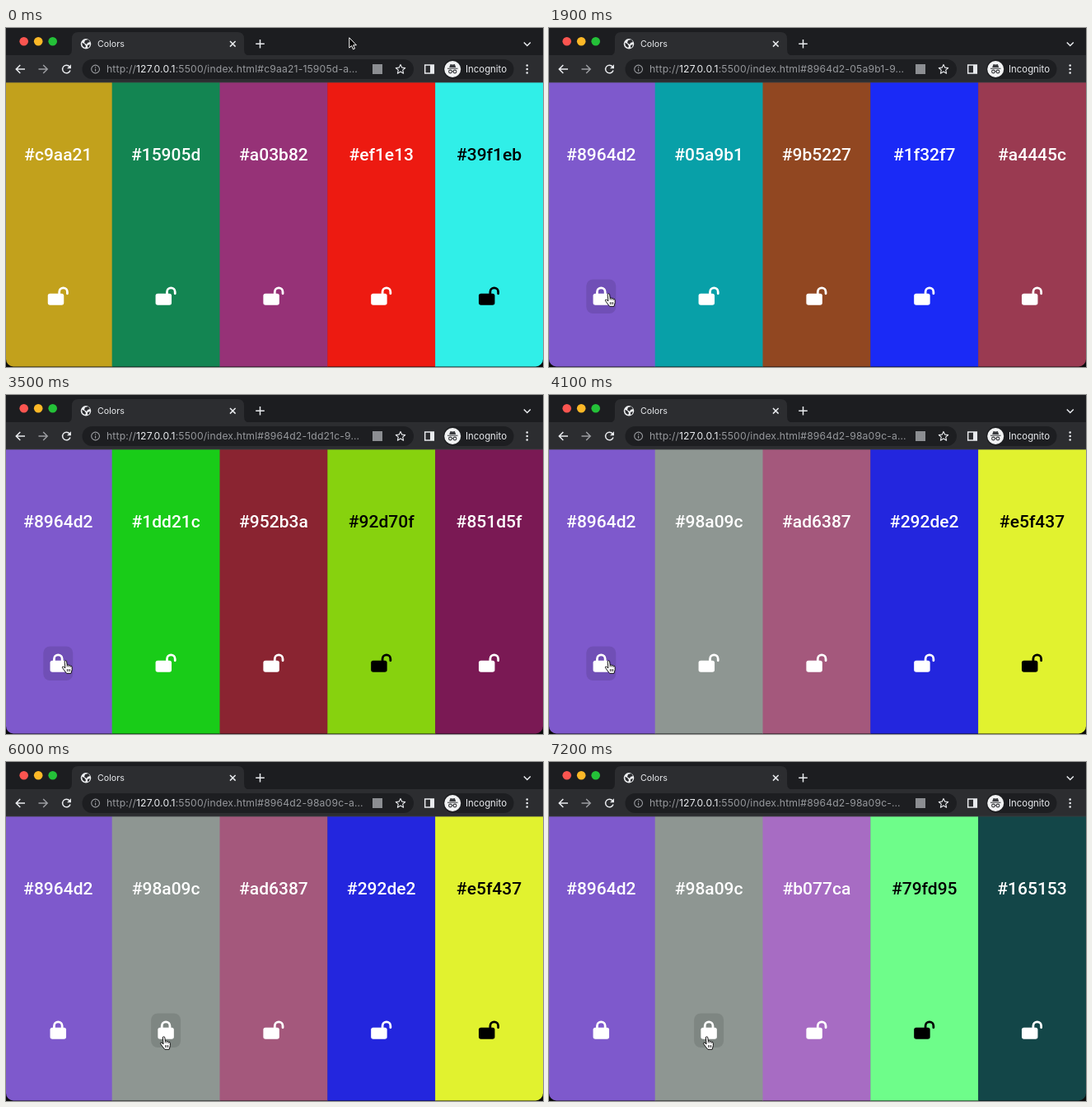
Recreate the animation shown at these times as an HTML page. Size 652 by 412 pixels, loop 8000 ms.

```html
<!DOCTYPE html>
<html lang="en">
<head>
<meta charset="utf-8">
<title>Colors</title>
<style>
  html, body { margin: 0; width: 100%; height: 100%; overflow: hidden; background: #0b0b0c; }
  svg { display: block; width: 652px; height: 412px; }
  text { white-space: pre; }
  .ui { font-family: Inter, "Liberation Sans", sans-serif; fill: #e8eaed; }
  .address { font-size: 12.2px; letter-spacing: .15px; }
  .grey { fill: #96989c; }
  .hex { font: 500 21px Roboto, "Liberation Sans", sans-serif; text-anchor: middle; stroke: none; }
  .line { fill: none; stroke: #e8eaed; stroke-width: 1.5; }
  .thin { stroke-width: 1.1; }
  .dim { stroke: #9a9ca0; }
</style>
</head>
<body>
<svg viewBox="0 0 652 412">
  <defs><clipPath id="window"><path d="M0 0H652V402.500a9 9 0 0 1-9 9H9a9 9 0 0 1-9-9z"/></clipPath></defs>
  <g clip-path="url(#window)">
    <rect width="652" height="34" fill="#1c1d20"/>
    <rect y="33" width="652" height="34" fill="#2c2d30"/>

    <!-- tab strip -->
    <circle cx="21.7" cy="16.3" r="5.3" fill="#fb5550"/>
    <circle cx="39.2" cy="16.3" r="5.3" fill="#fcb827"/>
    <circle cx="56.7" cy="16.3" r="5.3" fill="#24c138"/>
    <path fill="#2c2d30" d="M72 34q8 0 8-8V13q0-8 8-8H281q8 0 8 8v13q0 8 8 8z"/>
    <circle cx="97" cy="19.3" r="6.2" fill="#eceef0"/>
    <path fill="#2c2d30" d="M92 18l3 1 2 3-1 2-3-2zM96 15l4-1 2 3-3 1-1 2-3-2zM99 21l3-1-1 3-2 1z"/>
    <text class="ui" x="111" y="23" font-size="10.7">Colors</text>
    <path class="line" d="M272 16l6.600 6.600m0-6.600L272 22.600"/>
    <path class="line" d="M303.200 19.300h10.600M308.500 14v10.600"/>
    <path class="line" d="M628.800 17.500l4 4 4-4"/>

    <!-- toolbar -->
    <path class="line" d="M23 50H12.500M17.300 45l-5 5 5 5"/>
    <path class="line dim" d="M39.500 50H50M45.200 45l5 5-5 5"/>
    <path class="line" d="M77.200 47A4.800 4.800 0 1 0 78 51.500"/>
    <path fill="#e8eaed" d="M79 44.200v5h-5z"/>
    <rect x="92.500" y="38" width="402.500" height="24" rx="12" fill="#1d1e21"/>
    <circle class="line thin dim" cx="108.600" cy="50" r="4.900"/>
    <path class="line thin dim" d="M108.600 49.400v3.300M108.600 47v1.300"/>
    <text class="ui address" x="122" y="54.300"><tspan class="grey">http://</tspan>127.0.0.1<tspan id="path" class="grey"></tspan></text>
    <rect x="445" y="44" width="12" height="12" fill="#8c8e92"/>
    <path class="line thin" stroke-linejoin="round"
      d="M479 44.400l1.700 3.700 4 .4-3 2.700.9 4-3.600-2.100-3.600 2.100.9-4-3-2.700 4-.4z"/>
    <rect class="line" x="508.700" y="45" width="10.600" height="10"/>
    <path fill="#e8eaed" d="M515 45h4.500v10h-4.500z"/>
    <rect x="531" y="38" width="85.500" height="24" rx="12" fill="#1d1e21"/>
    <circle cx="542.200" cy="50" r="10" fill="#f1f2f3"/>
    <path fill="#393b3f" d="M536 48.700h12.500v1.100H536zM538.200 48l1.300-4q2.700.8 5.400 0l1.300 4z"/>
    <g fill="none" stroke="#393b3f" stroke-width="1.100">
      <circle cx="539.500" cy="53" r="1.900"/><circle cx="545" cy="53" r="1.900"/>
      <path d="M541.400 52.700h1.700"/>
    </g>
    <text class="ui" x="558" y="54" font-size="11.4">Incognito</text>
    <g fill="#e8eaed">
      <circle cx="632.700" cy="45.500" r="1.300"/><circle cx="632.700" cy="50" r="1.300"/>
      <circle cx="632.700" cy="54.500" r="1.300"/>
    </g>
    <g id="columns"></g>
    <path d="M0 66H652" stroke="#3c3d40" stroke-width=".8"/>
  </g>
  <g id="cursor" stroke-linejoin="round">
    <path id="arrow" fill="#000" stroke="#fff" d="M0 0V12.300l2.800-2.600 1.900 4.400 2-.9-1.900-4.200h3.800z"/>
    <g id="hand" fill="#fff" stroke="#000" stroke-width=".9">
      <path d="M-1.200 1Q-1.200-.2 0-.2T1.300 1l.6 4.300q1.300-.8 2 .3 1.300-.6 2 .6 1.800-.4 1.900 1.500l.1 3-1.200 4.600H1.300L-1.300 12l-2.600-3.600q-.3-1.500 1.300-1.300l2.200 1.700z"/>
      <path d="M1.900 5v2.500M3.900 5.700v2M5.900 6.300v1.700M2 10v3M3.700 10v3M5.400 10v3" stroke-width=".7"/>
    </g>
  </g>
</svg>
<script>
  const LOOP = 8000, STEP = 100;
  const WIDTH = 130.8, LEFT = -2.1;
  const UNITS = 0.0435; // lock icon units to pixels

  // start time, colours, length of the visible colour list in the address
  const palettes = [
    [0, 'c9aa21 15905d a03b82 ef1e13 39f1eb', 15],
    [100, '8964d2 05a9b1 9b5227 1f32f7 a4445c', 15],
    [2800, '8964d2 bbb51a 09b7f3 1de3b1 3b5dd6', 15],
    [3500, '8964d2 1dd21c 952b3a 92d70f 851d5f', 15],
    [4100, '8964d2 98a09c ad6387 292de2 e5f437', 15],
    [6500, '8964d2 98a09c 73bde5 5e6758 bd914c', 15],
    [7100, '8964d2 98a09c b077ca 79fd95 165153', 14]
  ].map(([at, list, cut]) => ({ at, colors: list.split(' '), cut }));

  const lockTimes = [1900, 5300];
  const moves = [
    { from: 900, to: 1800, a: [416.8, 11.8], b: [72.3, 323] },
    { from: 4200, to: 5300, a: [72.3, 323], b: [191.5, 334] }
  ];

  const byId = id => document.getElementById(id);
  const channels = hex => [0, 2, 4].map(i => parseInt(hex.slice(i, i + 2), 16) / 255);

  const shade = hex =>
    `rgb(${channels(hex).map(c => Math.round(255 * (0.02 + 0.98 * c ** 1.17))).join()})`;

  const luminance = hex => {
    const [r, g, b] = channels(hex).map(c =>
      c <= 0.03928 ? c / 12.92 : ((c + 0.055) / 1.055) ** 2.4);
    return 0.2126 * r + 0.7152 * g + 0.0722 * b;
  };

  const lockShape = locked => {
    const start = locked ? 112 : 320;
    return `<rect y="192" width="448" height="320" rx="64" stroke="none"/>
      <path d="M${start} 200V144a112 112 0 0 1 224 0v${locked ? 56 : 48}"
        fill="none" stroke-width="64" stroke-linecap="round"/>`;
  };
  const lockIcon = (locked, mid) => {
    const x = mid - (locked ? 448 : 576) / 2 * UNITS;
    return `<g transform="translate(${x} 314.4) scale(${UNITS})">${lockShape(locked)}</g>`;
  };

  const center = i => LEFT + WIDTH * (i + 0.5);
  const hovers = (i, [x, y]) => Math.abs(x - center(i)) < 18 && y > 305.5 && y < 347;

  const column = (hex, i, locked, hover) => {
    const ink = luminance(hex) > 0.5 ? '#000' : '#fff';
    const mid = center(i);
    return `<rect x="${LEFT + WIDTH * i}" y="66" width="${WIDTH + 0.5}" height="346" fill="${shade(hex)}"/>
      ${hover ? `<rect x="${mid - 18}" y="305.5" width="36" height="41.5" rx="8" fill="#000" opacity=".11"/>` : ''}
      <g fill="${ink}" stroke="${ink}">
        <text class="hex" x="${mid}" y="160.5">#${hex}</text>
        ${lockIcon(locked, mid)}
      </g>`;
  };

  const ease = p => p * p * (3 - 2 * p);
  const pointer = t => {
    const move = moves.filter(m => t >= m.from).pop() || moves[0];
    const p = ease(Math.min(1, Math.max(0, (t - move.from) / (move.to - move.from))));
    return move.a.map((v, k) => v + (move.b[k] - v) * p);
  };

  let shown = -1;
  function draw(t) {
    if (t === shown) return;
    shown = t;
    const { colors, cut } = palettes.filter(p => t >= p.at).pop();
    const pos = pointer(t);
    const over = colors.map((_, i) => hovers(i, pos));
    byId('path').textContent = ':5500/index.html#' + colors.join('-').slice(0, cut) + '…';
    byId('columns').innerHTML =
      colors.map((hex, i) => column(hex, i, t >= lockTimes[i], over[i])).join('');
    const hand = over.includes(true);
    byId('hand').style.display = hand ? '' : 'none';
    byId('arrow').style.display = hand ? 'none' : '';
    byId('cursor').setAttribute('transform', `translate(${pos})`);
  }

  const begin = performance.now();
  function tick() {
    const t = (performance.now() - begin) % LOOP;
    draw(Math.floor(t / STEP) * STEP);
    requestAnimationFrame(tick);
  }
  tick();
</script>
</body>
</html>
```
